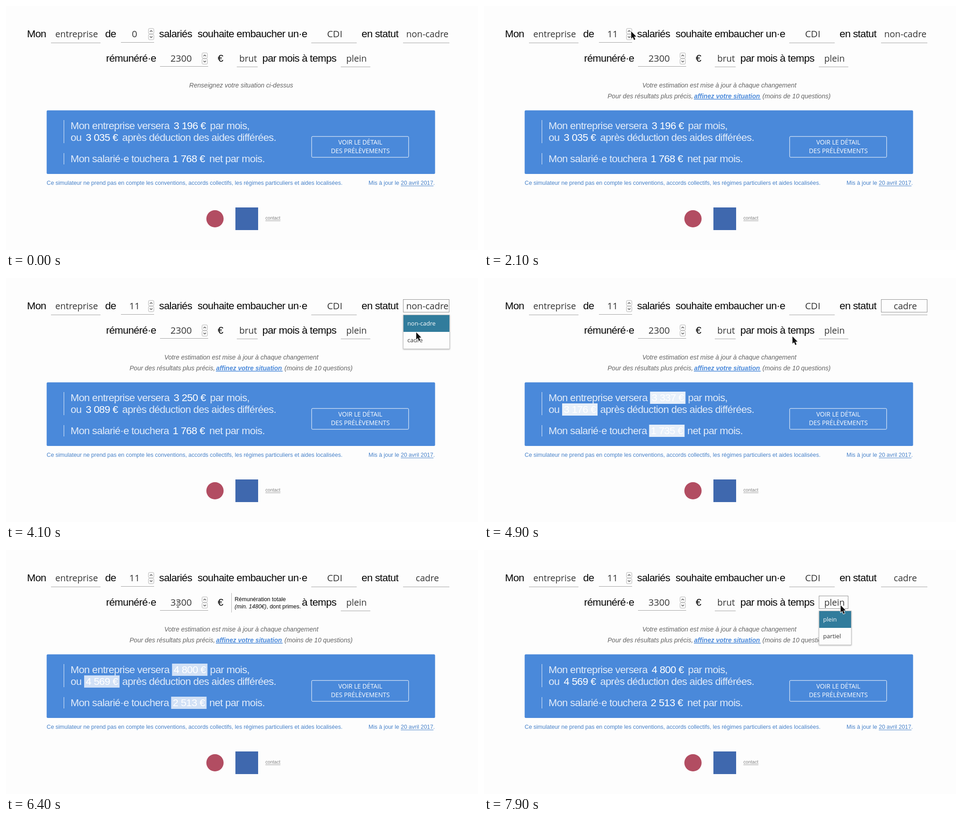
Animation, 1039 px wide and 539 px high, one loop 8 s. Source, as an HTML page with a canvas:

```html
<!DOCTYPE html>
<html lang="fr">
<head>
<meta charset="utf-8">
<title>Simulateur d'embauche</title>
<style>
html, body { margin: 0; width: 100%; height: 100%; overflow: hidden; background: #fdfdfd; }
canvas { display: block; width: 1039px; height: 539px; }
</style>
</head>
<body>
<canvas id="stage"></canvas>
<script>
const W = 1039, H = 539, LOOP = 8000, STEP = 100;
const canvas = document.getElementById('stage');
const ctx = canvas.getContext('2d');
const ratio = window.devicePixelRatio || 1;
canvas.width = W * ratio;
canvas.height = H * ratio;

const SANS = '"Liberation Sans", Arial, sans-serif';
const HUMAN = '"Open Sans", "Noto Sans", sans-serif';
const BODY = `22.6px ${SANS}`;
const NOTE = `italic 14.05px ${SANS}`;
const SMALL = `12.5px ${SANS}`;
const WORD = `19.6px ${HUMAN}`;
const DIGITS = `20.6px ${HUMAN}`;
const ITEM = `13.1px ${HUMAN}`;
const BLUE = '#4a89da', PAGE = '#fdfdfd', INK = '#343434';

// Result values, each set flashing when it arrives
const RESULTS = [
  { at: -9999, values: ['3 196 €', '3 035 €', '1 768 €'], flash: [] },
  { at: 2900, values: ['3 250 €', '3 089 €', '1 768 €'], flash: [0, 1] },
  { at: 4800, values: ['3 337 €', '3 176 €', '1 735 €'], flash: [0, 1, 2] },
  { at: 6200, values: ['4 800 €', '4 569 €', '2 513 €'], flash: [0, 1, 2] }
];
const SLOTS = [[404.5, 272], [211, 298], [402.5, 345]];
const FLASH_TIME = 800;

// Pointer stops: time, x, y
const PATH = [
  [500, 430, 36], [1000, 324, 56], [2300, 324, 56], [2900, 535, 70],
  [3600, 890, 62], [3800, 903, 64], [3900, 903, 72], [4100, 903, 120],
  [4300, 904, 136], [4600, 904, 136], [5300, 380, 120], [5700, 378, 120],
  [6400, 378, 120], [6900, 447, 121], [7200, 600, 124], [7700, 785, 122], [8000, 785, 122]
];

const clamp = v => Math.max(0, Math.min(1, v));
const ramp = (t, from, to) => clamp((t - from) / (to - from));
const during = (t, from, to) => t >= from && t < to;

function text(str, x, y, font, color, align = 'left') {
  ctx.font = font;
  ctx.letterSpacing = font === BODY ? '-0.66px' : '0px';
  ctx.fillStyle = color;
  ctx.textAlign = align;
  ctx.fillText(str, x, y);
}

function box(x, y, w, h, color) {
  ctx.fillStyle = color;
  ctx.fillRect(x, y, w, h);
}

function rounded(x, y, w, h, r) {
  ctx.beginPath();
  ctx.roundRect(x, y, w, h, r);
}

function spinner(x, y) {
  for (const dir of [-1, 1]) {
    const top = dir < 0 ? y : y + 13;
    ctx.strokeStyle = '#b9b9b9';
    ctx.fillStyle = '#f8f8f8';
    ctx.lineWidth = 1;
    rounded(x + 0.5, top + 0.5, 12, 12, 2.5);
    ctx.fill();
    ctx.stroke();
    ctx.strokeStyle = '#444';
    ctx.lineWidth = 1.2;
    ctx.beginPath();
    ctx.moveTo(x + 3.7, top + 6.5 - dir * 1.3);
    ctx.lineTo(x + 6.5, top + 6.5 + dir * 1.3);
    ctx.lineTo(x + 9.3, top + 6.5 - dir * 1.3);
    ctx.stroke();
  }
}

function field(str, x1, x2, base, line, font = WORD, center = (x1 + x2) / 2) {
  text(str, center, base, font, INK, 'center');
  box(x1, line, x2 - x1, 1, '#a2a2a2');
}

function focusRing(x, y, w, h) {
  ctx.strokeStyle = '#222';
  ctx.lineWidth = 1;
  ctx.setLineDash([1, 1]);
  ctx.strokeRect(x + 0.5, y + 0.5, w - 1, h - 1);
  ctx.setLineDash([]);
}

function popup(x, y, w, items, active) {
  ctx.save();
  ctx.shadowColor = 'rgba(0,0,0,.3)';
  ctx.shadowBlur = 3;
  ctx.shadowOffsetY = 1;
  box(x, y, w, 76, '#c4c4c4');
  ctx.restore();
  box(x + 1, y + 1, w - 2, 74, '#fdfdfd');
  items.forEach((item, i) => {
    if (i === active) box(x + 1, y + 1 + i * 37.5, w - 2, 37, '#317c9c');
    text(item, x + 9.5, y + 24 + i * 37, ITEM, i === active ? '#fff' : INK);
  });
}

function headcount(t) {
  if (t < 1100) return 0;
  return Math.min(11, 1 + Math.max(0, Math.floor((t - 1300) / 80)));
}

function sentence(t) {
  const row1 = 69, row2 = 123;
  for (const [str, x] of [['Mon', 46.3], ['de', 218.3], ['salariés', 337],
    ['souhaite embaucher un·e', 421.8], ['en statut', 782.8]])
    text(str, x, row1, BODY, '#050505');
  for (const [str, x] of [['rémunéré·e', 220.3], ['€', 466], ['par mois à temps', 564.3]])
    text(str, x, row2, BODY, '#050505');

  const manager = t >= 4500;
  field('entreprise', 99, 208, row1, 81, WORD, 155.5);
  field(String(headcount(t)), 253, 326, row1, 80, DIGITS, 283);
  field('CDI', 672, 772, row1, 81, DIGITS, 723.5);
  field(manager ? 'cadre' : 'non-cadre', 874, 976, row1, 81, WORD, 927.5);
  field(t < 6100 ? '2300' : '3300', 339, 445, row2, 133, DIGITS, 385.5);
  field('brut', 508, 554, row2, 134, WORD, 533);
  field('plein', 737, 802, row2, 134, WORD, 771.5);
  spinner(313, 49);
  spinner(431, 103);
  if (during(t, 3900, 5800)) focusRing(874, 47, 102, 29);
  if (t >= 7700) focusRing(737, 101, 65, 29);
}

function wageTip() {
  box(497, 94, 154, 45, PAGE);
  box(496, 95, 1, 43, '#b5b5b5');
  text('Rémunération totale', 503.3, 112.5, SMALL, '#050505');
  text('(min. 1480€)', 503.3, 128.5, `italic ${SMALL}`, '#050505');
  const w = ctx.measureText('(min. 1480€)').width;
  text(', dont primes.', 503.3 + w, 128.5, SMALL, '#050505');
}

function hints(t) {
  ctx.globalAlpha = 1 - ramp(t, 1100, 1500);
  text('Renseignez votre situation ci-dessus', 517.7, 180, NOTE, '#626262', 'center');
  ctx.globalAlpha = ramp(t, 1500, 1900);
  text('Votre estimation est mise à jour à chaque changement', 518, 180, NOTE, '#626262', 'center');
  text('Pour des résultats plus précis,', 272, 203.5, NOTE, '#626262');
  text('affinez votre situation', 462.5, 203.5, `bold ${NOTE}`, BLUE);
  box(462, 205, 147, 1.5, BLUE);
  text('(moins de 10 questions)', 613, 203.5, NOTE, '#626262');
  ctx.globalAlpha = 1;
}

function results(t) {
  ctx.fillStyle = BLUE;
  rounded(89.5, 230.5, 855, 140.5, 2.5);
  ctx.fill();
  box(127, 252, 1, 51, '#e4edf9');
  box(127, 325, 1, 25, '#e4edf9');
  const soft = '#e1ebf9';
  text('Mon entreprise versera', 142, 272, BODY, soft);
  text('par mois,', 449, 272, BODY, soft);
  text('ou', 142.3, 298, BODY, soft);
  text('après déduction des aides différées.', 255.8, 298, BODY, soft);
  text('Mon salarié·e touchera', 142, 345, BODY, soft);
  text('net par mois.', 447.5, 345, BODY, soft);

  const now = RESULTS.filter(r => t >= r.at).pop();
  const glow = 1 - clamp((t - now.at) / FLASH_TIME);
  SLOTS.forEach(([x, y], i) => {
    if (now.flash.includes(i)) box(x - 39, y - 21, 78, 27, `rgba(255,255,255,${glow})`);
    text(now.values[i], x, y, BODY, '#fff', 'center');
  });

  ctx.strokeStyle = '#fff';
  ctx.lineWidth = 1;
  rounded(672.8, 288.2, 213.5, 46, 2);
  ctx.stroke();
  text('VOIR LE DÉTAIL', 780, 306, `13.75px ${HUMAN}`, '#fff', 'center');
  text('DES PRÉLÈVEMENTS', 780, 325, `13.75px ${HUMAN}`, '#fff', 'center');
}

function footer() {
  const blue = '#4681c9';
  text('Ce simulateur ne prend pas en compte les conventions, accords collectifs, les régimes particuliers et aides localisées.',
    89.6, 395, SMALL, blue);
  text('Mis à jour le 20 avril 2017.', 944, 395, SMALL, blue, 'right');
  box(869, 397, 72, 1, blue);
  ctx.fillStyle = '#b24d62';
  ctx.beginPath();
  ctx.arc(460, 470, 19, 0, 7);
  ctx.fill();
  box(505, 445, 50, 50, '#3f68ae');
  text('contact', 571, 472, `10.2px ${SANS}`, '#858585');
  box(571, 474, 33, 1, '#9a9a9a');
}

function pointerAt(t) {
  const i = PATH.findIndex(p => p[0] > t);
  if (i < 1) return null;
  const [a, b] = [PATH[i - 1], PATH[i]];
  const k = ramp(t, a[0], b[0]);
  return [a[1] + (b[1] - a[1]) * k, a[2] + (b[2] - a[2]) * k];
}

function polyline(points) {
  ctx.beginPath();
  points.forEach(([x, y]) => ctx.lineTo(x, y));
}

function pointer(t) {
  const pos = pointerAt(t);
  if (!pos) return;
  ctx.save();
  ctx.translate(Math.round(pos[0]), Math.round(pos[1]));
  if (during(t, 2600, 3600) || during(t, 5200, 6600)) {
    for (const [color, width] of [['#fff', 3], ['#222', 1]]) {
      ctx.strokeStyle = color;
      ctx.lineWidth = width;
      ctx.beginPath();
      for (const [x1, y1, x2, y2] of [[-2, -6.5, 3, -6.5], [0.5, -6, 0.5, 6], [-2, 6.5, 3, 6.5]]) {
        ctx.moveTo(x1, y1);
        ctx.lineTo(x2, y2);
      }
      ctx.stroke();
    }
  } else {
    polyline([[0, 0], [0, 16], [3.6, 12.8], [6.2, 19], [9, 17.8], [6.4, 11.8], [11.2, 11.5]]);
    ctx.closePath();
    ctx.lineWidth = 2;
    ctx.lineJoin = 'round';
    ctx.strokeStyle = '#fff';
    ctx.stroke();
    ctx.fillStyle = '#111';
    ctx.fill();
  }
  ctx.restore();
}

function draw(t) {
  ctx.setTransform(ratio, 0, 0, ratio, 0, 0);
  box(0, 0, W, H, PAGE);
  sentence(t);
  if (during(t, 5300, 7400)) wageTip();
  hints(t);
  results(t);
  footer();
  if (during(t, 3900, 4600)) popup(874, 81, 103, ['non-cadre', 'cadre'], t < 4200 ? 0 : 1);
  if (t >= 7800) popup(737, 134, 72, ['plein', 'partiel'], 0);
  pointer(t);
}

const start = performance.now();
function frame() {
  const t = (performance.now() - start) % LOOP;
  draw(Math.floor(t / STEP) * STEP);
  requestAnimationFrame(frame);
}
frame();
</script>
</body>
</html>
```
